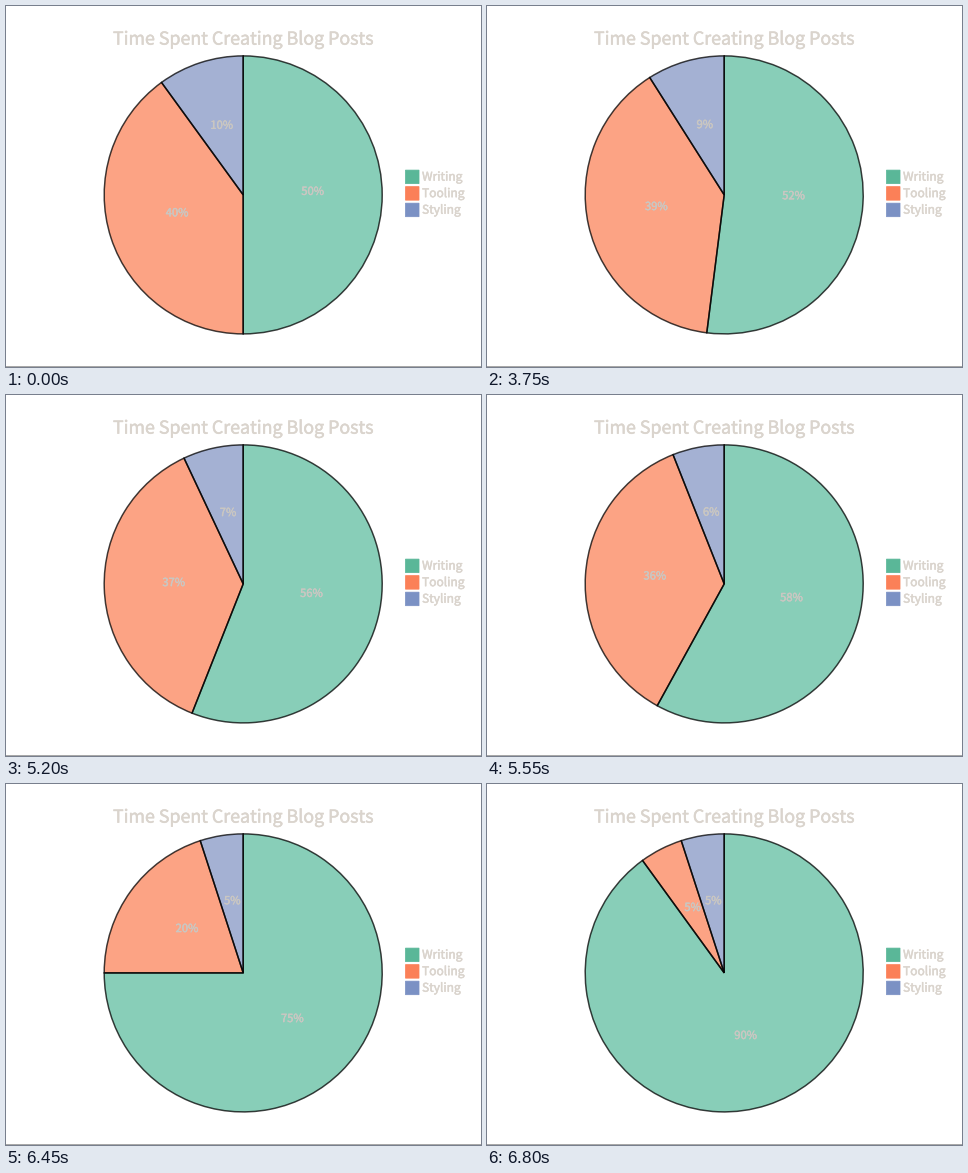
A matplotlib script that plays this animation: 475 by 361 pixels, repeating every 8 s.

```python
import math

import matplotlib.pyplot as plt
from matplotlib.animation import FuncAnimation
from matplotlib.patches import Rectangle, Wedge
from matplotlib.patheffects import withStroke

W, H, DPI = 475, 361, 100
STEP, LOOP = 50, 8000
CX, CY = 237.2, 188.9
SCALE = 139 / 185  # chart units to pixels
PX = 72 / DPI      # one pixel in points
R = 185
TEXT, LABEL = "#dad4cd", "#cac7c2"

# name, slice colour, legend colour
PARTS = [
    ("Writing", "#88ceb8", "#5ab798"),
    ("Tooling", "#fca384", "#fb8058"),
    ("Styling", "#a4b1d3", "#7b91c4"),
]
CHANGES = [3750, 4500, 5200, 5550, 5750, 6000, 6150, 6450, 6500, 6700, 6800]

plt.rcParams["text.hinting"] = "none"
fig = plt.figure(figsize=(W / DPI, H / DPI), dpi=DPI, facecolor="white")
ax = fig.add_axes([0, 0, 1, 1])
ax.set_xlim(-CX / SCALE, (W - CX) / SCALE)
ax.set_ylim((H - CY) / SCALE, -CY / SCALE)
ax.axis("off")


def write(x, y, s, size, color, align="center"):
    text = ax.text(x, y, s, fontsize=size * PX, color=color, ha=align,
                   va="baseline", family="Noto Sans CJK JP", zorder=5)
    text.set_path_effects([withStroke(linewidth=0.45 * PX, foreground=color)])
    return text


def shares(t):
    """Percent of each part: steps of 2 up to 60, then steps of 5."""
    k = sum(t >= change for change in CHANGES)
    writing = 50 + 2 * k if k < 5 else 35 + 5 * k
    styling = max(5, 10 - k)
    return writing, 100 - writing - styling, styling


write(0, -200, "Time Spent Creating Blog Posts", 17.8, TEXT)
for i, (name, _, key) in enumerate(PARTS):
    y = 22 * i - 33
    ax.add_patch(Rectangle((216, y), 18, 18, fc=key, ec=key,
                           lw=SCALE * PX, snap=False))
    write(238, y + 14, name, 12, TEXT, "left")
fig.add_artist(Rectangle((0, 0), 1, 1 / H, fc="#a8a8a8", ec="none"))

slices, edges, labels = [], [], []
for _, fill, _ in PARTS:
    slices.append(ax.add_patch(Wedge((0, 0), R, 0, 90, fc=fill, ec="none", zorder=2)))
    edges.append(ax.add_patch(Wedge((0, 0), R, 0, 90, fc="none", ec=(0, 0, 0, 0.75),
                                    lw=2 * SCALE * PX, snap=False, zorder=3)))
    labels.append(write(0, 0, "", 11.2, LABEL))


def draw(frame):
    begin = 0
    for share, fill, edge, label in zip(shares(frame * STEP), slices, edges, labels):
        end = begin + share
        for wedge in (fill, edge):
            wedge.set_theta1(begin * 3.6 - 90)
            wedge.set_theta2(end * 3.6 - 90)
        mid = math.pi * (begin + end) / 100
        label.set_position((R / 2 * math.sin(mid), -R / 2 * math.cos(mid)))
        label.set_text(f"{share}%")
        begin = end
    return slices + edges + labels


anim = FuncAnimation(fig, draw, frames=LOOP // STEP, interval=STEP,
                     repeat=True, repeat_delay=0, blit=False)
plt.show()
```
